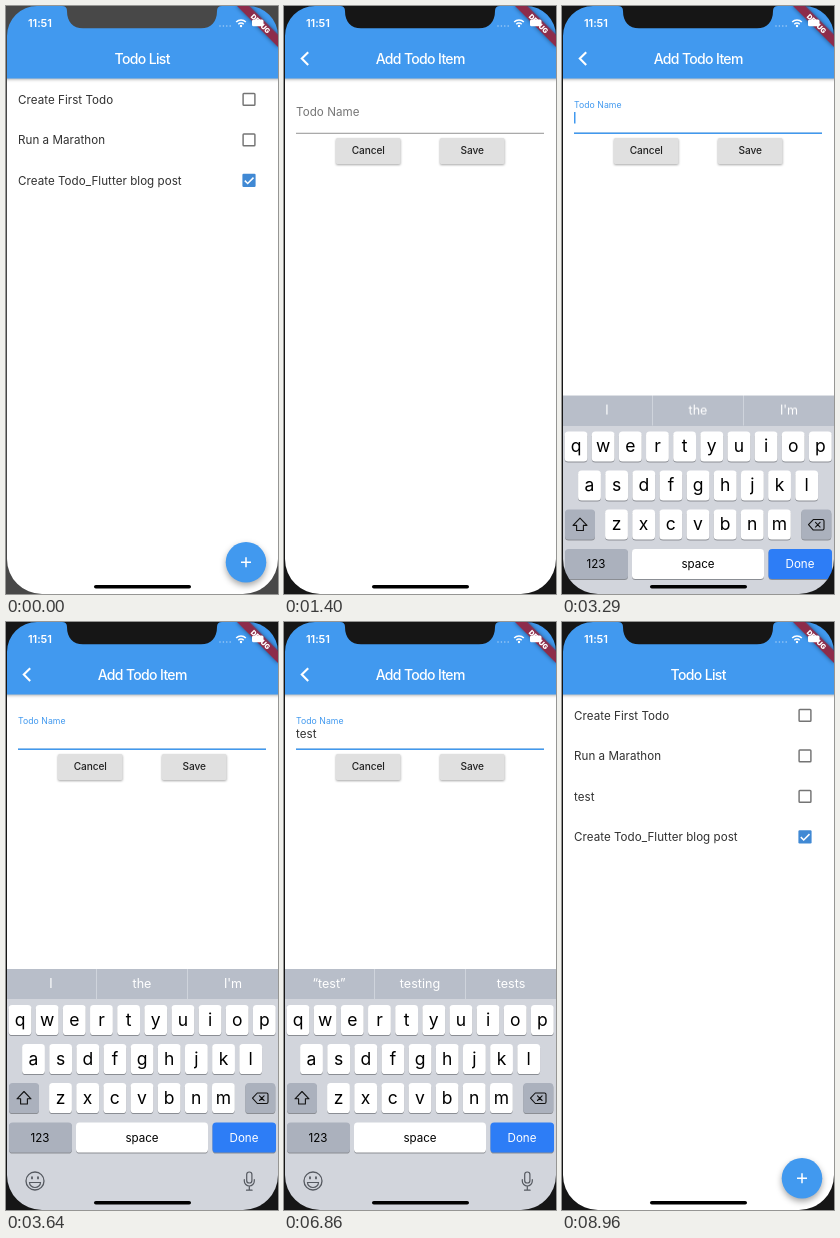
Recreate the animation shown at these times as an HTML page. Size 272 by 588 pixels, loop 9.03 s.

```html
<!DOCTYPE html>
<html lang="en">
<head>
<meta charset="utf-8">
<title>Todo List</title>
<style>
  html, body { margin: 0; width: 100%; height: 100%; overflow: hidden; background: #161616; }
  svg { display: block; width: 272px; height: 588px; overflow: hidden; }
  text { font-family: Inter, Roboto, sans-serif; white-space: pre; }
  .bar { fill: #4199ef; filter: drop-shadow(0 1.8px 1.8px rgba(0, 0, 0, .32)); }
  .title { fill: #fff; font-weight: 500; letter-spacing: -.65px; }
  .body { fill: #303030; letter-spacing: .04px; }
  .button { fill: #e0e0e0; filter: drop-shadow(0 1.2px 1px rgba(0, 0, 0, .35)); }
  .caption { fill: #222; font-weight: 500; letter-spacing: -.1px; }
  .fab { fill: #4199ef; filter: drop-shadow(0 3px 3px rgba(0, 0, 0, .35)); }
  .label { fill: #757575; letter-spacing: .06px; transform-origin: 12px 106px; }
  .key { fill: #fff; }
  .key.dark { fill: #abb1bd; }
  .key.blue { fill: #2d7df6; }
  .line { fill: none; stroke-linecap: round; stroke-linejoin: round; }
  .sharp { stroke-linecap: butt; stroke-linejoin: miter; }
  .splash { transform-box: fill-box; transform-origin: center; }
  #glow { fill: #2a8fe0; filter: blur(5px); }
</style>
</head>
<body>
<svg id="stage" viewBox="0 0 272 588"></svg>
<script>
const LOOP = 9030;
const stage = document.getElementById('stage');

// Text placed by the middle of its capitals.
const label = (x, cy, size, str, attrs = '') =>
  `<text x="${x}" y="${(cy + size * .36).toFixed(2)}" font-size="${size}" ${attrs}>${str}</text>`;
const centered = (x, cy, size, str, attrs = '') =>
  label(x, cy, size, str, `text-anchor="middle" ${attrs}`);
const rect = (x, y, w, h, attrs = '') =>
  `<rect x="${x}" y="${y}" width="${w}" height="${h}" ${attrs}/>`;
const line = (d, color, width, kind = '') =>
  `<path class="line ${kind}" d="${d}" stroke="${color}" stroke-width="${width}"/>`;

const page = title =>
  rect(0, 0, 272, 588, 'fill="#fff"') + rect(-2, -4, 276, 76.5, 'class="bar"') +
  centered(136.2, 52.6, 14, title, 'class="title"');

const todo = (row, name, done) => {
  const cy = 93.4 + row * 40.5;
  const box = done
    ? rect(236.4, cy - 6.6, 13.2, 13.2, 'rx="1.2" fill="#4089d4"') +
      line(`M238.8 ${cy + .2}l2.9 2.9l5.8 -5.9`, '#fff', 1.5, 'sharp')
    : rect(237.1, cy - 5.9, 11.8, 11.8, 'rx=".8" fill="none" stroke="#747474" stroke-width="1.45"');
  return label(12, cy, 11.6, name, 'class="body"') + box;
};

const listPage = `<g id="list">${page('Todo List')}
  ${todo(0, 'Create First Todo')}${todo(1, 'Run a Marathon')}
  <g id="fresh">${todo(2, 'test')}</g>
  <g id="last">${todo(2, 'Create Todo_Flutter blog post', true)}</g>
  <circle class="fab" cx="240" cy="556.3" r="20.3"/>
  <circle id="fabSplash" class="splash" cx="240" cy="556.3" r="20.3" fill="#fff"/>
  ${line('M235 556.3h10M240 551.3v10', '#fff', 1.5, 'sharp')}</g>`;

const button = (x, name) =>
  rect(x, 132, 64.5, 26, 'rx="1.5" class="button"') + centered(x + 32.2, 144.7, 10.15, name, 'class="caption"');

const addPage = `<g id="add">
  ${rect(-6, 0, 6, 588, 'fill="url(#edge)"')}${page('Add Todo Item')}
  ${line('M24.2 46.2L17.8 52.6L24.2 59', '#fff', 2.1, 'sharp')}
  ${label(12, 106, 11.6, 'Todo Name', 'id="hint" class="label"')}
  ${label(12, 112, 11.6, [...'test'].map(c => `<tspan>${c}</tspan>`).join(''), 'id="typed" class="body"')}
  ${rect(12, 106, 1.5, 11.5, 'id="caret" fill="#4199ef"')}
  ${rect(12, 126.8, 248, .9, 'fill="#868686"')}
  ${rect(12, 126.5, 248, 1.5, 'id="underline" fill="#4199ef"')}
  ${button(52, 'Cancel')}${button(156, 'Save')}
  ${rect(156, 132, 64.5, 26, 'id="saveSplash" class="splash" rx="1.5"')}</g>`;

const key = (x, y, w, kind = '') =>
  rect(x, y + 1, w, 30, 'rx="3.6" fill="#8b8e94"') + rect(x, y, w, 30, `rx="3.6" class="key ${kind}"`);
const keyRow = (letters, x, y) => [...letters].map((c, i) => {
  const cx = x + i * 27.15;
  return key(cx - 11.4, y, 22.8) + centered(cx, y + 14.3, 17.5, c);
}).join('');

const suggestions = [
  { at: 0, words: ['I', 'the', 'I\'m'] },
  { at: 4720, words: ['“t”', 'the', 'this'] },
  { at: 4910, words: ['“te”', 'tell', 'tea'] },
  { at: 5140, words: ['“tes”', 'test', 'tests'] },
  { at: 5350, words: ['“test”', 'testing', 'tests'] },
];
const words = suggestions.map(s => `<g class="words" fill="#fff">${
  s.words.map((w, i) => centered(45 + i * 91, 361, 12.6, w)).join('')}</g>`).join('');

const keyboard = `<g id="keyboard">
  <g id="predict">${rect(0, 347, 272, 31, 'fill="#b8bec9"')}
    ${[90, 181].map(x => rect(x, 347, .9, 30, 'fill="#d2d6de"')).join('')}${words}</g>
  ${rect(0, 377, 272, 212, 'fill="#d2d5dc"')}
  ${keyRow('qwertyuiop', 14, 383)}${keyRow('asdfghjkl', 27.5, 422)}${keyRow('zxcvbnm', 54.5, 461)}
  ${key(3, 461, 30, 'dark')}${key(239.3, 461, 30, 'dark')}
  ${line('M18 469.5L25 476.8H21.4V482H14.6V476.8H11Z', '#111', 1.1)}
  ${line('M246.5 476.2L251.3 471H260.5Q262 471 262 472.5V480Q262 481.5 260.5 481.5H251.3ZM253.5 473.9l4.6 4.6m0 -4.6l-4.6 4.6', '#111', 1.1)}
  ${key(3, 500.5, 63, 'dark')}${key(70, 500.5, 132)}${key(206.5, 500.5, 63.5, 'blue')}
  ${centered(34, 515.7, 11.6, '123')}${centered(136, 515.7, 11.6, 'space')}
  ${centered(238, 515.7, 11.6, 'Done', 'fill="#fff"')}
  <g stroke="#555960">
    <circle cx="29" cy="559" r="9" fill="none" stroke-width="1.3"/>
    <path d="M23.5 560.5h11a5.5 5 0 0 1 -11 0Z" fill="none" stroke-width="1.2"/>
    ${line('M26 555.2v1.2M32 555.2v1.2', '#555960', 1.8)}
    <rect x="240.7" y="550" width="5.2" height="11" rx="2.6" fill="none" stroke-width="1.2"/>
    ${line('M238.3 557.5v1.5a5 5 0 0 0 10 0v-1.5M243.3 564v4M240.5 568.2h5.6', '#555960', 1.2)}
  </g></g>
  <circle id="glow" cx="246" cy="562" r="17"/>`;

const banner = `<g transform="translate(272 0) rotate(45)">
  ${rect(-29, 20.3, 58, 8.7, 'fill="#8d2c4a" style="filter:drop-shadow(0 0 2px rgba(0,0,0,.5))"')}
  ${centered(0, 24.9, 7, 'DEBUG', 'fill="#fff" font-weight="900" letter-spacing="-.1"')}</g>`;

const status = `
  ${label(22, 17, 11, '11:51', 'fill="#fff" font-weight="600" letter-spacing="-.08"')}
  ${[0, 1, 2, 3].map(i => `<circle cx="${214 + i * 3.4}" cy="20" r=".8" fill="#fff" opacity=".5"/>`).join('')}
  ${line('M230.2 16a6.6 6.6 0 0 1 9.6 0M232.3 18.2a3.8 3.8 0 0 1 5.4 0', '#fff', 1.5, 'sharp')}
  <circle cx="235" cy="20" r="1.2" fill="#fff"/>
  ${rect(246, 13.4, 11.5, 6.8, 'rx="1.5" fill="#fff"')}`;

const bezel = `<path id="bezel" fill-rule="evenodd" fill="#161616" d="M-1 -1H273V589H-1Z
  M1 30A30 30 0 0 1 31 0H56Q61 0 61 5C61 16 67 22.3 77 22.3H195C205 22.3 211 16 211 5Q211 0 216 0H242
  A30 30 0 0 1 272 30V553A35 35 0 0 1 237 588H36A35 35 0 0 1 1 553Z"/>
  ${rect(88, 578.9, 97, 3.6, 'rx="1.8" fill="#000"')}`;

stage.innerHTML = `<defs><linearGradient id="edge">
  <stop offset="0" stop-opacity="0"/><stop offset="1" stop-opacity=".12"/></linearGradient></defs>
  ${listPage}${addPage}${keyboard}${banner}${status}${bezel}`;

// Each stop is [ms, value, easing towards the next stop]; values hold by default.
function track(el, prop, stops) {
  const frames = stops.map(([ms, value, easing = 'step-end']) =>
    ({ offset: ms / LOOP, [prop]: value, easing }));
  frames.push({ offset: 1, [prop]: stops[stops.length - 1][1] });
  el.animate(frames, { duration: LOOP, iterations: Infinity }).startTime = start;
}
const start = document.timeline.currentTime || 0;
const $ = id => document.getElementById(id);
const SLIDE = 'cubic-bezier(.35,.91,.33,.97)';
const SPRING = 'cubic-bezier(.2,.7,.2,1)';
const moveX = px => `translateX(${px}px)`;
const moveY = px => `translateY(${px}px)`;

const push = 930, focus = 3080, rise = 3159, pop = 7300, fall = 7797;
const strokes = [4690, 4880, 5110, 5320];

track($('bezel'), 'fill', [[0, '#484848', 'linear'], [630, '#161616']]);

// Page transitions
const slide = (el, away, shown) => track(el, 'transform', [
  [0, moveX(away)], [push, moveX(away), SLIDE], [push + 400, moveX(shown)],
  [pop, moveX(shown), SLIDE], [pop + 400, moveX(away)]]);
slide($('add'), 280, 0);
slide($('list'), 0, -90);
track($('fresh'), 'opacity', [[0, 0], [pop + 50, 1]]);
track($('last'), 'transform', [[0, moveY(0)], [pop + 50, moveY(40.5)]]);

const splash = (el, at, strength) => {
  track(el, 'transform', [[0, 'scale(0)'], [at, 'scale(.2)', 'ease-out'], [at + 220, 'scale(1)']]);
  track(el, 'opacity', [[0, 0], [at, strength], [at + 120, strength, 'linear'], [at + 400, 0]]);
};
splash($('fabSplash'), 820, .25);
splash($('saveSplash'), 7150, .12);

// Field focus and typing
track($('hint'), 'transform', [[0, 'none'], [focus, 'translateY(0px) scale(1)', 'ease-in-out'],
  [focus + 180, 'translateY(-7.5px) scale(.75)']]);
track($('hint'), 'fill', [[0, '#757575'], [focus, '#757575', 'linear'], [focus + 150, '#4199ef']]);
track($('underline'), 'opacity', [[0, 0], [focus, 0, 'linear'], [focus + 150, 1]]);
[...$('typed').children].forEach((c, i) => track(c, 'fillOpacity', [[0, 0], [strokes[i], 1]]));
track($('caret'), 'transform', [[0, moveX(0)], ...strokes.map((ms, i) =>
  [ms, moveX($('typed').getEndPositionOfChar(i).x - 12)])]);

// The caret blinks every 500 ms and restarts with each stroke.
const blink = [[0, 0]];
[focus, ...strokes].forEach((from, i, all) => {
  const until = all[i + 1] || pop;
  for (let ms = from, on = 1; ms < until; ms += 500, on = 1 - on) blink.push([ms, on]);
});
track($('caret'), 'opacity', blink);

// Keyboard; the round button glows through it as it leaves.
track($('keyboard'), 'transform', [[0, moveY(241)], [rise, moveY(241), SPRING], [rise + 400, moveY(0)],
  [fall, moveY(0), SPRING], [fall + 400, moveY(241)]]);
track($('predict'), 'opacity', [[0, 1], [fall, 0]]);
track($('glow'), 'opacity', [[0, 0], [fall, .2, 'linear'], [fall + 150, 0]]);
document.querySelectorAll('.words').forEach((el, i) => {
  const { at } = suggestions[i], next = suggestions[i + 1];
  const stops = at ? [[0, 0], [at, 0, 'linear'], [at + 150, 1]] : [[0, 1]];
  if (next) stops.push([next.at, 1, 'linear'], [next.at + 150, 0]);
  track(el, 'opacity', stops);
});
</script>
</body>
</html>
```
